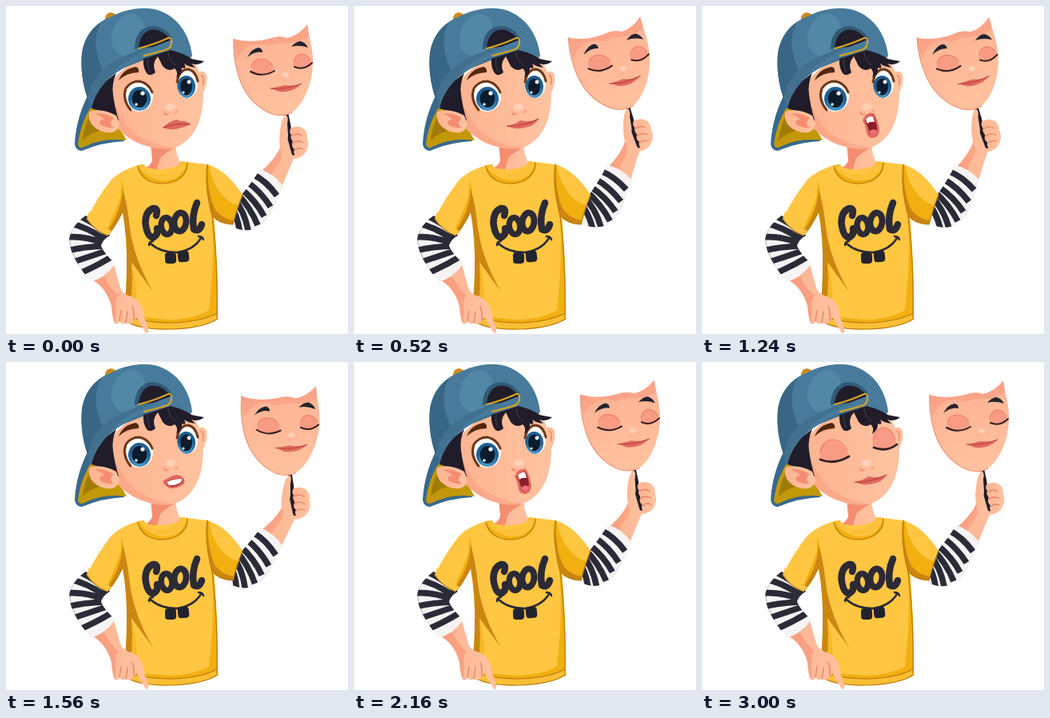
An HTML page for the animation above (4.52 s loop, 428 by 410 pixels).

```html
<!DOCTYPE html>
<html lang="en">
<head>
<meta charset="utf-8">
<title>Boy with a mask</title>
<style>
html, body { margin: 0; width: 100%; height: 100%; overflow: hidden; background: #fff; }
svg { display: block; width: 100%; height: 100%; }
.line { fill: none; stroke-linecap: round; stroke-linejoin: round; }
.skin { fill: url(#skin); }
.shade { fill: #f58d70; }
.ink { fill: #23232e; }
.hair { fill: #211c29; }
.shirt { fill: #ffc642; }
.fold { fill: #cb8612; }
.half { fill: #f1af10; }
.seam { stroke: #bb7d0d; stroke-width: 1.2; }
.stripes { stroke: #2b2b38; stroke-width: 7.6; stroke-linecap: butt; }
.lip { fill: #e0675e; }
.lid { fill: #f89b84; }
.crease { stroke: #ee8069; stroke-width: 1.2; }
.finger { stroke: #ea8263; stroke-width: 1.3; }
.lash { stroke: #6d3817; stroke-width: 3; }
</style>
</head>
<body>
<svg viewBox="0 0 428 410" role="img" aria-label="Boy in a COOL shirt holding a mask">
<defs>
  <linearGradient id="skin"><stop offset="0" stop-color="#fdb492"/><stop offset="1" stop-color="#ffc3a0"/></linearGradient>
  <linearGradient id="maskSkin" x1="0" y1="0" x2=".25" y2="1"><stop offset="0" stop-color="#fba68b"/><stop offset=".3" stop-color="#fdb595"/><stop offset="1" stop-color="#ffc09d"/></linearGradient>
  <radialGradient id="iris" cy=".75"><stop offset="0" stop-color="#5bb4e3"/><stop offset="1" stop-color="#1f5f92"/></radialGradient>
  <path id="nearSleeve" d="M104 259C91 267 80 279 79 292C80 311 93 328 106 345Q124 340 137 322C128 314 120 305 119 299Q122 291 130 287Z"/>
  <path id="farSleeve" d="M270 222L293 238Q307 222 318 204Q334 209 346 224C338 246 328 268 316 276Q301 285 281 275Z"/>
  <clipPath id="nearClip"><use href="#nearSleeve"/></clipPath>
  <clipPath id="farClip"><use href="#farSleeve"/></clipPath>
  <clipPath id="leftEye"><ellipse cx="166" cy="113" rx="18" ry="19"/></clipPath>
  <clipPath id="rightEye"><ellipse cx="227" cy="97" rx="13" ry="18"/></clipPath>
</defs>

<g id="arm">
  <path class="skin" d="M319 207Q338 190 343 177C341 167 343 154 345 145Q348 136 352 137Q356 143 355 153Q367 148 373 154Q378 158 377 166Q380 174 376 181Q372 190 360 191Q352 209 345 227Z"/>
  <path class="shade" d="M319 207Q338 190 343 177Q347 186 343 194Q336 203 331 213Z" opacity=".45"/>
  <path class="line" stroke="#201d28" stroke-width="5" d="M350 131L354 150L355 166L360 184"/>
  <path class="skin" d="M343 166Q344 141 350 136Q354 138 352 147L353 162Q352 172 345 177Z"/>
  <path class="skin" d="M356 153Q365 149 373 154Q377 158 377 166Q380 173 376 181Q370 189 362 188Q359 182 361 179Q356 176 359 169Q355 165 357 161Q354 158 356 153Z"/>
  <path class="line finger" d="M358 162Q365 158 370 162M359 171Q366 167 372 171M362 180Q367 176 372 179"/>
  <use href="#farSleeve" fill="#f5f3f3"/>
  <g clip-path="url(#farClip)">
    <path class="line stripes" d="M310 211Q326 219 339 237M302 220Q319 232 331 251M295 229Q313 244 323 263M289 234Q306 252 315 274M284 239Q300 258 304 286M279 245Q291 264 293 286"/>
    <path d="M346 224Q333 260 316 277Q303 283 283 276L287 280L320 283L352 225Z" fill="#555467" opacity=".25"/>
  </g>
  <path d="M285 41Q305 47 329 41Q343 36 352 40Q366 37 377 23C380 42 385 58 384 73C383 99 372 123 358 133Q347 139 333 135C310 126 295 106 289 80Q284 59 285 41Z" fill="url(#maskSkin)"/>
  <path d="M285 42Q305 47 329 41Q343 36 352 40Q366 37 377 24L379 38Q365 47 350 46Q337 46 329 50Q318 46 306 49Q294 55 288 68Z" fill="#f69179" opacity=".45"/>
  <path class="line" stroke="#f0957a" stroke-width="1.2" d="M285 41Q284 62 289 80C295 106 310 126 333 135Q347 139 358 133"/>
  <path class="ink" d="M302 64Q308 53 316 52Q321 53 321 58Q312 56 302 64ZM357 51Q363 44 369 44Q375 46 378 52Q367 48 357 51Z"/>
  <path class="lid" d="M307 82Q306 69 318 66Q331 65 335 80Q321 89 307 82ZM360 77Q359 63 368 60Q378 59 382 72Q372 80 360 77Z"/>
  <path class="line crease" d="M307 76Q309 67 318 66Q329 66 334 75M360 70Q363 61 369 60Q377 60 381 68"/>
  <path class="line" stroke="#351d22" stroke-width="2" d="M306 82Q321 90 336 81M361 76Q373 81 383 71"/>
  <path class="shade" d="M343 91Q347 94 350 91Q348 95 343 91ZM353 91Q357 92 358 88Q359 92 353 91Z"/>
  <ellipse cx="350" cy="86" rx="4" ry="3" fill="#ffd0b8"/>
  <path class="lip" d="M331 103Q342 101 348 99L353 99.500Q362 100 370 97Q363 104 355 106Q343 109 337 105Z"/>
  <path class="line" stroke="#b9443c" stroke-width="1" d="M331 103Q350 105 370 97"/>
</g>

<path class="skin" d="M181 166L183 194Q178 202 168 204Q195 226 224 200Q213 196 212 168Z"/>
<path class="shade" d="M181 172Q198 181 211 177Q197 185 193 190Q190 200 187 212Q177 210 171 205Q184 200 183 190Z"/>

<path class="shirt" d="M165 199Q143 206 132 217Q115 238 101 266Q111 281 127 287Q138 274 146 258Q152 292 151 327Q151 365 145 390Q163 405 206 404Q246 403 265 391Q266 340 260 263Q272 273 284 273Q289 253 296 236Q276 205 252 198L227 195Q195 211 165 199Z"/>
<path class="half" d="M101 266Q111 281 127 287Q138 274 146 258Q150 232 144 216Q146 238 138 253L127 279Q114 274 104 260Z"/>
<path class="fold" d="M127 286Q139 273 146 258Q152 292 151 327Q151 365 145 390L153 394Q160 360 157 320Q175 345 184 357Q160 316 155 277Q152 249 146 228Q145 255 128 280Z"/>
<path class="half" d="M157 320Q165 347 163 394L153 394Q160 360 157 320Z" opacity=".6"/>
<path class="half" d="M252 198Q247 222 257 262Q268 274 284 273L291 249Q276 246 265 229Q257 217 254 199Z"/>
<path class="fold" d="M252 199Q249 225 258 262Q268 274 284 273L285 268Q271 266 262 255Q251 232 253 199Z"/>
<path class="half" d="M257 262Q262 311 254 380Q242 389 210 392Q169 391 146 382L145 390Q163 405 206 404Q246 403 265 391Q266 330 260 263Z"/>
<path d="M146 386Q170 396 210 396Q246 394 264 384L265 391Q246 403 206 404Q163 405 145 390Z" fill="#fcbf34"/>
<path class="half" d="M165 199L173 198Q175 207 189 211Q208 213 219 194L227 195Q230 209 214 219Q194 227 175 217Q165 211 165 199Z"/>
<path d="M166 201L173 199Q179 210 194 212Q211 209 219 194L226 196Q224 211 208 217Q184 223 166 201Z" fill="#fdc23b"/>
<path class="line seam" d="M252 198Q248 224 258 262Q265 319 264 390M296 236Q289 253 284 273Q270 272 259 263M101 266Q111 281 127 287Q137 276 145 258M146 386Q170 396 210 396Q246 394 264 384M145 391Q163 405 206 404Q246 403 265 391M165 201Q168 212 178 218Q195 226 213 218Q227 210 227 196M104 260Q114 274 129 280"/>

<g class="line" stroke="#2b2a35">
  <path stroke-width="8.5" d="M188 262Q191 252 184 253Q174 257 174.500 272Q177 290 185 289Q191 285 189 278"/>
  <ellipse cx="201" cy="275" rx="6.8" ry="10.500" stroke-width="7.5" transform="rotate(-8 201 275)"/>
  <ellipse cx="218" cy="270" rx="7.500" ry="11.500" stroke-width="8" transform="rotate(8 218 270)"/>
  <path stroke-width="8.5" d="M239 246Q232 262 235 279Q242 283 245 273"/>
  <path stroke-width="2.5" d="M181 297Q193 308 214 308Q235 305 244 290M179 299Q179 294 184 294M241 288Q246 288 247 292"/>
</g>
<rect class="ink" x="199" y="308" width="14" height="14" rx="4" transform="rotate(-2 206 315)"/>
<rect class="ink" x="215" y="306" width="14" height="14" rx="4" transform="rotate(-6 222 313)"/>

<path class="skin" d="M109 343Q126 353 132 375Q133 389 136 397Q140 399 142 394Q146 400 150 396Q155 400 160 394L163 389L175 409Q179 410 178 403Q173 391 171 379Q167 367 157 363Q146 361 143 352L135 323Z"/>
<path class="shade" d="M109 343Q126 353 132 375Q133 389 136 397Q138 391 137 376Q137 365 141 362Q130 353 123 338Z" opacity=".55"/>
<path class="line finger" d="M142 394L144 381M150 396L152 382M160 393Q161 383 158 376"/>
<use href="#nearSleeve" fill="#f5f3f3"/>
<g clip-path="url(#nearClip)">
  <path class="line stripes" d="M90 262Q107 268 131 289M81 272Q101 276 124 292M76 289Q98 287 121 296M76 306Q97 301 122 300M81 321Q102 314 126 306M90 335Q112 326 133 313"/>
  <path d="M98 260Q77 280 82 301Q90 325 106 347L92 346L70 300L82 264Z" fill="#555467" opacity=".25"/>
</g>
<path class="shirt" d="M101 266L104 257Q116 274 132 281L127 287Q111 281 101 266Z"/>
<path class="line seam" d="M101 266Q111 281 127 287"/>

<path d="M108 102C95 122 87 149 86 173Q88 181 95 181Q121 170 148 169L134 126Z" fill="#38698c"/>
<path d="M106 127C98 139 92 156 90 173Q92 179 98 176Q121 164 151 168L135 140Z" fill="#c39808"/>
<path d="M105 137Q97 153 96 168Q112 151 137 157L132 144Z" fill="#a07b08"/>
<path class="skin" d="M237 85Q247 78 251 86Q253 97 246 110Z"/>
<path class="line finger" d="M244 87Q249 87 246 99"/>
<path class="skin" d="M133 94Q154 64 206 54L232 64C242 78 247 95 247 112C246 145 235 167 212 177Q189 182 165 171C147 162 138 153 135 144Z"/>
<path class="shade" d="M134 142C140 156 156 169 173 174Q195 181 212 177C195 176 168 168 154 152Q144 141 138 126Z" opacity=".35"/>
<path class="hair" d="M107 128Q105 112 114 102L138 84Q132 97 134 111Q136 126 141 143Q128 142 119 135L122 132Z"/>
<path class="skin" d="M138 137Q120 127 104 132Q102 142 109 150Q120 160 133 158Q140 156 142 148Z"/>
<path class="shade" d="M135 140Q121 132 110 135Q118 136 123 142Q115 142 118 148Q125 153 135 152Q127 147 135 140Z"/>
<path d="M141 93Q146 79 162 76Q167 77 166 83Q151 83 141 93Z" fill="#54270f"/>

<g id="openEyes">
  <ellipse cx="166" cy="113" rx="18" ry="19" fill="#fff"/>
  <g clip-path="url(#leftEye)">
    <ellipse cx="167" cy="116" rx="14" ry="15" fill="url(#iris)"/>
    <ellipse cx="167" cy="116" rx="9.5" ry="11" fill="#0d1c2c"/>
    <circle cx="171" cy="109" r="2.6" fill="#fff"/><circle cx="163" cy="123" r="1.8" fill="#d9f2ff"/>
  </g>
  <path class="line lash" d="M156 130Q145 117 150 103Q156 94 167 94Q179 97 183 108"/>
  <ellipse cx="227" cy="97" rx="13" ry="18" fill="#fff"/>
  <g clip-path="url(#rightEye)">
    <ellipse cx="225.500" cy="101" rx="11.5" ry="14" fill="url(#iris)"/>
    <ellipse cx="225.500" cy="101" rx="7.5" ry="10.500" fill="#0d1c2c"/>
    <circle cx="229" cy="95" r="2.4" fill="#fff"/><circle cx="222" cy="108" r="1.6" fill="#d9f2ff"/>
  </g>
  <path class="line lash" d="M214 95Q217 80 227 79Q237 80 240 94"/>
</g>
<g id="closedEyes">
  <path class="lid" d="M148 121Q145 103 158 98Q176 94 183 117Q165 128 148 121ZM214 106Q212 86 225 82Q240 81 243 103Q230 112 214 106Z"/>
  <path class="line crease" d="M148 113Q151 99 162 97Q176 97 182 111M214 98Q217 83 226 82Q238 82 242 97"/>
  <path class="line" stroke="#351d22" stroke-width="2.8" d="M148 122Q166 129 184 118M215 107Q231 113 244 103"/>
</g>

<ellipse cx="206" cy="126" rx="6" ry="4.5" fill="#ffd0b8"/>
<path class="shade" d="M197 131Q201 137 205 133Q203 138 198 136ZM208 133Q214 134 215 129Q217 135 208 133Z"/>
<g class="mouth" id="frown">
  <path class="lip" d="M196 152Q206 143 214 142L218 144Q225 143 231 148Q225 151 216 153Q207 156 196 152Z"/>
  <path class="line" stroke="#aa3935" stroke-width="1.2" d="M197 152Q212 146 230 148"/>
</g>
<g class="mouth" id="teeth">
  <path class="lip" d="M196 149Q205 143 213 141L218 142Q225 146 223 152Q216 158 206 158Q200 157 196 149Z"/>
  <path d="M200 150Q210 145 221 146Q222 151 217 153Q209 157 204 155Z" fill="#9b2532"/>
  <path d="M201 150Q210 146 220 146Q221 150 216 152Q209 155 204 154Z" fill="#fff"/>
</g>
<g class="mouth" id="wide">
  <path class="lip" d="M201 143Q204 135 210 134L215 134Q219 139 222 154Q222 164 214 165Q207 165 206 158Q205 150 201 143Z"/>
  <path d="M204 143Q208 137 214 137Q218 143 219 154Q217 161 210 161Q208 150 204 143Z" fill="#8c1c28"/>
  <path d="M205 142Q209 137 214 138L216 145Q210 144 207 147Z" fill="#fff"/>
  <path d="M209 157Q214 152 219 156Q217 162 211 161Z" fill="#ed7076"/>
</g>
<g class="mouth" id="smile">
  <path class="lip" d="M191 150Q202 148 208 143L214 144Q222 145 231 141Q226 149 218 151Q205 155 197 152Z"/>
  <path class="line" stroke="#b9443c" stroke-width="1.1" d="M191 150Q211 151 231 141"/>
</g>

<path d="M124 19Q123 9 131 8Q138 9 140 15Z" fill="#cf8a1d"/>
<path d="M107 128C96 103 93 80 95 59C98 38 110 22 130 14C150 3 177 -1 195 7C218 17 230 38 233 62Q231 67 224 66Q214 61 206 55Q161 60 132 85C116 99 110 115 107 128Z" fill="#487b9b"/>
<path d="M107 128C96 103 93 80 95 59C98 42 106 29 119 20Q105 46 121 80Q111 94 107 128Z" fill="#3a6686"/>
<ellipse cx="153" cy="36" rx="20" ry="27" fill="#5288a6" transform="rotate(20 153 36)"/>
<path d="M107 128C111 110 125 88 151 76Q178 65 206 55L205 44Q163 53 132 71Q108 87 103 114Z" fill="#41718f"/>
<path class="hair" d="M163 53Q164 34 177 28Q197 23 208 42L184 51Z"/>
<path d="M161 54Q161 32 177 26Q198 22 209 42L207 43Q194 27 180 30Q167 35 166 53Z" fill="#315a76"/>
<path class="hair" d="M172 66L206 55Q225 60 232 66Q241 68 248 69Q241 75 232 72L237 77Q228 76 223 72Q227 80 220 77Q221 84 213 90Q216 82 211 78Q203 83 196 75L190 63Q182 72 187 83Q181 89 176 84Q171 76 172 66Z"/>
<path class="line" stroke="#46414f" stroke-width="1" d="M203 59Q204 68 212 74M178 66Q176 73 180 82"/>
<path d="M137 79Q160 60 207 43L206 54Q162 64 135 85Z" fill="#487b9b"/>
<path class="line" stroke="#d7a322" stroke-width="2.2" d="M166 53Q186 48 203 40Q208 39 207 46Q207 51 202 54Q186 59 173 62"/>
</svg>

<script>
const LOOP = 4520, STEP = 40, REST = 3000;
const SWING = 5.8;
const SWING_STARTS = [0, 730, 1460, 2190, 2880];
const LEVELS = [0, 1, 0, -1, 0];
const MOUTHS = [
  [0, "frown"], [120, "teeth"], [320, "wide"], [480, "smile"], [640, "wide"],
  [880, "teeth"], [1080, "wide"], [1360, "frown"], [1520, "teeth"], [1720, "smile"],
  [1840, "teeth"], [2040, "wide"], [2200, "smile"], [2360, "teeth"], [2560, "wide"],
  [2720, "frown"], [REST, "smile"]
];
const byId = id => document.getElementById(id);
const show = (node, on) => { node.style.display = on ? "" : "none"; };
const mouthNodes = [...document.querySelectorAll(".mouth")];

// Each swing eases through four quarters: out, back, out the other way, back.
function swingAngle(time) {
  const next = SWING_STARTS.findIndex(start => start > time);
  if (next < 0) return 0;
  const from = SWING_STARTS[next - 1];
  const quarters = 4 * (time - from) / (SWING_STARTS[next] - from);
  const index = Math.floor(quarters), p = quarters % 1;
  const eased = p * p * (3 - 2 * p);
  return SWING * (LEVELS[index] + (LEVELS[index + 1] - LEVELS[index]) * eased);
}

function draw(now) {
  const time = Math.floor(now % LOOP / STEP) * STEP;
  byId("arm").setAttribute("transform", `rotate(${swingAngle(time)} 262 215)`);
  const mouth = MOUTHS.filter(([start]) => start <= time).pop()[1];
  mouthNodes.forEach(node => show(node, node.id === mouth));
  show(byId("openEyes"), time < REST);
  show(byId("closedEyes"), time >= REST);
}

const start = performance.now();
function tick() {
  draw(performance.now() - start);
  requestAnimationFrame(tick);
}
tick();
</script>
</body>
</html>
```
